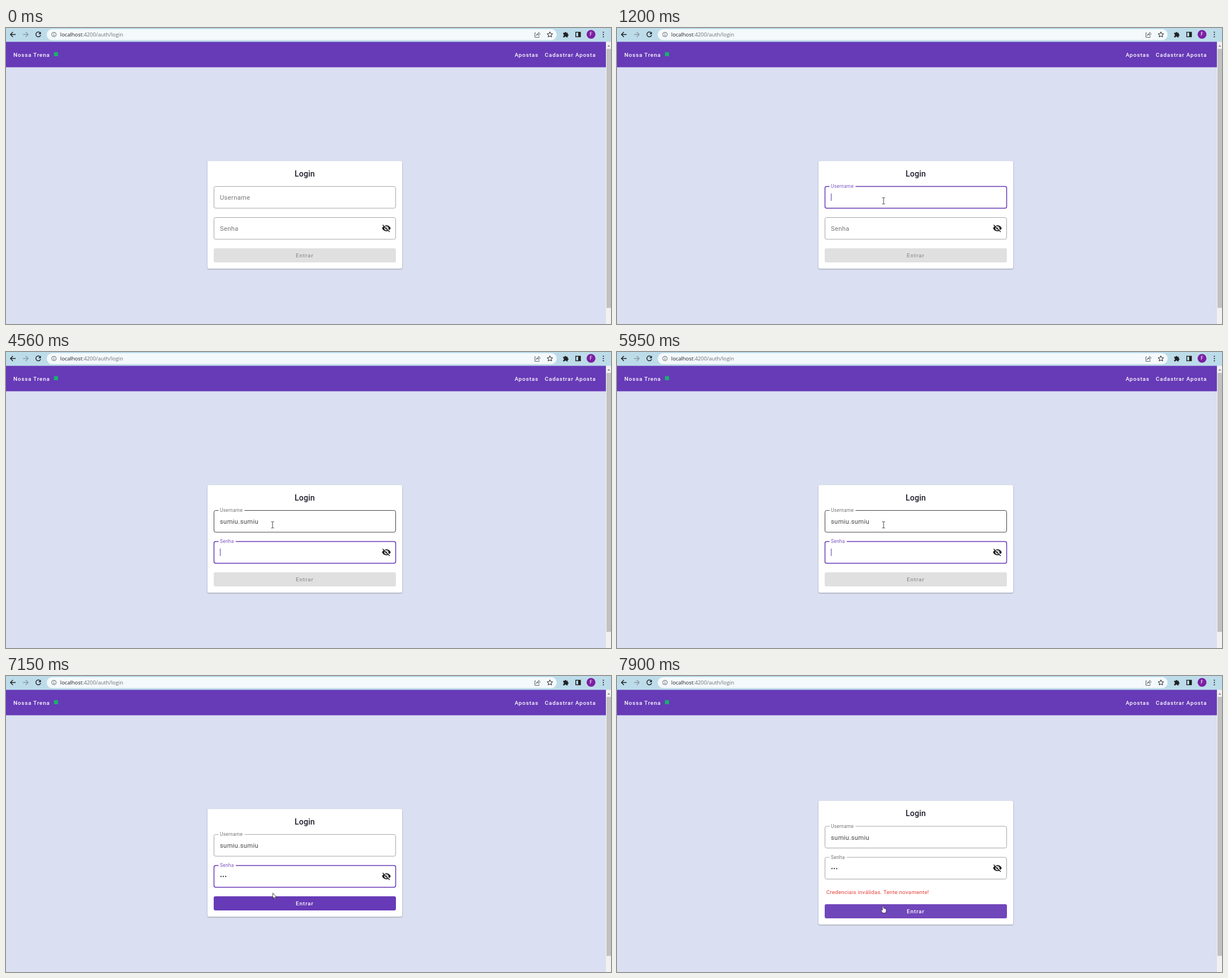
An HTML page that plays this animation: 1069 by 524 pixels, repeating every 8000 ms.

```html
<!DOCTYPE html>
<html lang="pt">
<head>
<meta charset="utf-8">
<title>Login</title>
<style>
html, body { margin: 0; width: 100%; height: 100%; overflow: hidden; background: #dadff1; }
svg { display: block; width: 100%; height: 100%; }
text { font-family: Roboto, sans-serif; white-space: pre; }
.btn { font-size: 9.8px; font-weight: 500; letter-spacing: .875px; }
.input { font-size: 11.2px; letter-spacing: .35px; }
.url { font: 9.35px "Open Sans", sans-serif; }
.line { fill: none; stroke: #202124; stroke-width: 1.4; }
#card { fill: #fff; filter: drop-shadow(0 1px 1px rgba(0,0,0,.3)); }
</style>
</head>
<body>
<svg viewBox="0 0 1069 524" preserveAspectRatio="none">
  <rect width="1069" height="524" fill="#dadff1"/>

  <!-- browser bar -->
  <rect width="1069" height="25" fill="#bddcea"/>
  <rect x="72" y="2" width="901" height="19.5" rx="9.75" fill="#f4f9fc"/>
  <path class="line" d="M17 11.5H8M12.200 7L7.800 11.500L12.200 16"/>
  <path class="line" style="stroke:#8b9aa5" d="M30 11.500H39M34.800 7L39.200 11.500L34.800 16"/>
  <path class="line" d="M60.400 8.600A4.300 4.300 0 1 0 61.200 12.500"/>
  <path d="M61.700 6.500V11H57.200z" fill="#202124"/>
  <g class="line" style="stroke:#5f6368;stroke-width:1">
    <circle cx="84.700" cy="11.500" r="4"/>
    <path d="M84.700 11V14M84.700 8.800V10"/>
    <path d="M936 8.500H934.500V16.500H942V14.500M936.500 13.500Q937.500 10 941 9.800V7.500L944 10.500L941 13.300V11.500Q938 11.500 936.500 13.500z"/>
  </g>
  <path class="line" style="stroke-width:1" d="M961 6.800L962.400 10L966 10.300L963.300 12.600L964.100 16L961 14.200L957.900 16L958.700 12.600L956 10.300L959.600 10z"/>
  <path fill="#202124" d="M984.500 8.500H987A1.500 1.500 0 0 1 990 8.500H992.500V11A1.500 1.500 0 0 1 992.500 14V16.500H990A1.500 1.500 0 0 0 987 16.500H984.500V14A1.500 1.500 0 0 0 984.500 11z"/>
  <rect class="line" x="1006.700" y="7.500" width="8.300" height="8"/>
  <rect x="1011" y="7.500" width="4" height="8" fill="#202124"/>
  <circle cx="1033.700" cy="11.300" r="7.800" fill="#7b1fa2"/>
  <text x="1033.700" y="14.400" font-size="8.500" text-anchor="middle" fill="#fff">F</text>
  <g fill="#202124"><circle cx="1055.500" cy="7.500" r="1.100"/><circle cx="1055.500" cy="11.500" r="1.100"/><circle cx="1055.500" cy="15.500" r="1.100"/></g>
  <text class="url" x="95.800" y="15" fill="#202124">localhost<tspan fill="#6a7075">:4200/auth/login</tspan></text>

  <!-- page header and scrollbar -->
  <rect y="24.500" width="1060" height="45" fill="#673ab7"/>
  <g class="btn" fill="#fff">
    <text x="13" y="50.500">Nossa Trena</text>
    <text x="898.700" y="50.500">Apostas</text>
    <text x="952" y="50.500">Cadastrar Aposta</text>
  </g>
  <rect x="84.700" y="42.700" width="7.300" height="7.300" rx="1" fill="#1bae72"/>
  <rect x="1060" y="24.500" width="9" height="500" fill="#f1f1f1"/>
  <rect x="1061" y="37" width="8" height="458.500" fill="#c1c1c1"/>
  <path d="M1062.500 33L1065 30L1067.500 33z" fill="#8a8a8a"/>

  <!-- login card -->
  <rect id="card" x="356" width="344" rx="3"/>
  <g id="form">
    <text x="510" y="262.700" font-size="14" font-weight="500" letter-spacing=".175" fill="#1d1d2b">Login</text>
    <g id="fields"></g>
    <g transform="translate(663.700 346) scale(.7)">
      <path fill="#212121" d="M1 12C2.700 7.600 7 4.500 12 4.500s9.300 3.100 11 7.500c-1.700 4.400-6 7.500-11 7.500S2.700 16.400 1 12z"/>
      <circle cx="12" cy="12" r="5" fill="#fff"/>
      <circle cx="12" cy="12" r="3" fill="#212121"/>
      <path d="M3.900 2.300L21.700 20.100" stroke="#fff" stroke-width="1.900"/>
      <path d="M2.600 3.600L20.400 21.400" stroke="#212121" stroke-width="1.900"/>
    </g>
  </g>
  <text id="error" x="369.700" y="386.400" font-size="9.800" letter-spacing=".175" fill="#e5443b">Credenciais inválidas. Tente novamente!</text>
  <g id="button">
    <clipPath id="clip"><rect x="367" y="390" width="322" height="25" rx="3"/></clipPath>
    <rect id="face" x="367" y="390" width="322" height="25" rx="3"/>
    <g clip-path="url(#clip)" fill="#fff">
      <rect id="glow" x="367" y="390" width="322" height="25" opacity=".06"/>
      <circle id="ripple" cx="470" cy="408"/>
    </g>
    <text id="enter" class="btn" x="512" y="406">Entrar</text>
  </g>

  <!-- pointers, each with its hot spot at 0,0 -->
  <g id="pointer">
    <path id="beam" fill="none" stroke="#444" d="M-2.500 -5.500H-.700L0 -5L.700 -5.500H2.500M0 -5V5M-2.500 5.500H-.700L0 5L.700 5.500H2.500"/>
    <path id="arrow" fill="#fff" stroke="#222" stroke-width=".8" d="M.400 0V9.500L2.600 7.500L4.200 11L5.700 10.300L4.200 7H7z"/>
    <path id="hand" fill="#fff" stroke="#222" stroke-width=".7" d="M-1 .800Q0 -.500 1 .800V4.300Q2 3.700 2.600 4.700Q3.700 4.200 4.200 5.200Q5.500 4.900 5.600 6.300V9.500L4.600 12.500H-.500L-3.300 8.300Q-3.500 6.700 -2.200 7L-1 8z"/>
  </g>
</svg>
<script>
const LOOP = 8000, BLINK = 535;
const PURPLE = '#673ab7';
const FOCUS_USER = 1000, FOCUS_PASS = 4350, PRESS = 7480, ERROR = 7630, RELEASE = 7760;
const USER = 'sumiu.sumiu';
const USER_KEYS = [1600, 1800, 1950, 2150, 2350, 2680, 2810, 3010, 3140, 3340, 3540];
const PASS_KEYS = [6220, 6285, 6350];
// time, x, y
const PATH = [[320, 884, 486], [800, 471, 306], [6900, 471, 306], [7150, 471, 384], [7350, 470, 407]];

const $ = id => document.getElementById(id);
const set = (el, attrs) => { for (const k in attrs) el.setAttribute(k, attrs[k]); };
const show = (el, on) => set(el, { visibility: on ? 'visible' : 'hidden' });
const clamp = v => Math.max(0, Math.min(1, v));
const ease = p => p * p * (3 - 2 * p);
const mix = (a, b, p) => a + (b - a) * p;

function makeField(top, label, notch) {
  const g = document.createElementNS('http://www.w3.org/2000/svg', 'g');
  g.innerHTML = `<rect x="367.5" y="${top + .5}" width="321" height="38.5" rx="3" fill="none"/>
    <rect x="375.5" y="${top - 1}" width="${notch}" height="3" fill="#fff"/>
    <text class="input">${label}</text>
    <text class="input" x="378" y="${top + 24}" fill="#444"></text>
    <rect y="${top + 13}" width="1" height="13" fill="${PURPLE}"/>`;
  $('fields').append(g);
  const [box, gap, name, value, caret] = g.children;
  return { top, box, gap, name, value, caret };
}

function drawField(f, t, start, end, keys, text, pos) {
  const focused = t >= start && t < end;
  const hover = pos && pos.x > 367 && pos.x < 689 && pos.y > f.top && pos.y < f.top + 39;
  const lift = ease(clamp((t - start) / 150));
  const typed = keys.filter(k => t >= k);
  set(f.box, {
    stroke: focused ? PURPLE : hover ? '#424242' : '#a6a6a6',
    'stroke-width': focused ? 1.5 : 1
  });
  show(f.gap, t >= start);
  set(f.name, {
    transform: `translate(378 ${f.top + mix(24, 3.3, lift)}) scale(${mix(1, .75, lift)})`,
    fill: focused ? '#7c55c2' : '#757575'
  });
  f.value.textContent = text.slice(0, typed.length);
  const since = t - (typed.length ? typed[typed.length - 1] : start);
  show(f.caret, focused && Math.floor(since / BLINK) % 2 === 0);
  set(f.caret, { x: 378 + (typed.length ? f.value.getComputedTextLength() : 0) });
}

function pointerAt(t) {
  if (t < PATH[0][0]) return null;
  const i = PATH.findIndex(p => p[0] > t);
  if (i < 0) return { x: 470, y: 407 };
  const [a, b] = [PATH[i - 1], PATH[i]];
  const p = clamp((t - a[0]) / (b[0] - a[0]));
  const q = i === 3 ? p : 1 - (1 - p) ** 2;
  return { x: mix(a[1], b[1], q), y: mix(a[2], b[2], q) };
}

const user = makeField(280, 'Username', 46);
const pass = makeField(335, 'Senha', 30.5);

function draw(t) {
  const pos = pointerAt(t), failed = t >= ERROR, enabled = t >= PASS_KEYS[0];
  drawField(user, t, FOCUS_USER, FOCUS_PASS, USER_KEYS, USER, pos);
  drawField(pass, t, FOCUS_PASS, PRESS, PASS_KEYS, '•••', pos);

  set($('card'), { y: failed ? 221 : 235.5, height: failed ? 219 : 190.5 });
  set($('form'), { transform: `translate(0 ${failed ? -14.5 : 0})` });
  set($('button'), { transform: `translate(0 ${failed ? 14 : 0})` });
  show($('error'), failed);

  const inColumn = pos && pos.x > 367 && pos.x < 689;
  const onButton = inColumn && enabled && pos.y > 390;
  const onField = inColumn && (pos.y > 280 && pos.y < 319 || pos.y > 335 && pos.y < 374);
  set($('face'), { fill: enabled ? PURPLE : '#e0e0e0' });
  set($('enter'), { fill: enabled ? '#fff' : '#949494' });
  show($('glow'), onButton);
  set($('ripple'), {
    r: t < PRESS ? 0 : 225 * ease(clamp((t - PRESS) / 225)),
    opacity: .12 * (1 - clamp((t - RELEASE) / 140))
  });

  if (pos) set($('pointer'), { transform: `translate(${pos.x} ${pos.y})` });
  show($('beam'), onField);
  show($('hand'), onButton);
  show($('arrow'), pos && !onField && !onButton);
}

const begin = performance.now();
function tick() {
  draw((performance.now() - begin) % LOOP);
  requestAnimationFrame(tick);
}
tick();
</script>
</body>
</html>
```
